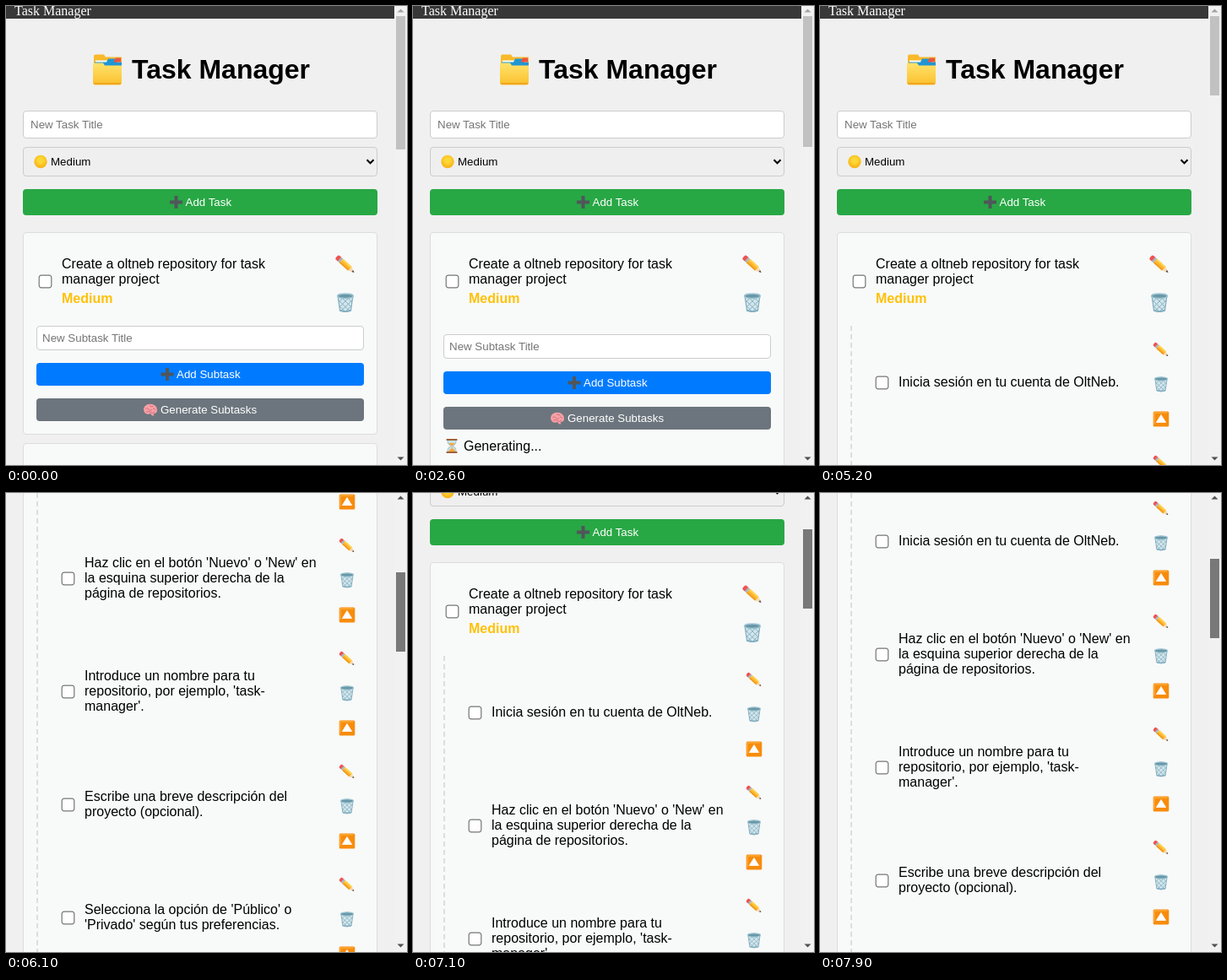
Recreate the animation shown at these times as an HTML page. Size 475x544 px, loop 8000 ms.

```html
<!DOCTYPE html>
<html lang="en">
<head>
<meta charset="utf-8">
<title>Task Manager</title>
<style>
  html, body { margin: 0; width: 100%; height: 100%; overflow: hidden; background: #f0f0f0; }
  svg { display: block; width: 100vw; height: 100vh; }
  text { font: 16px "Liberation Sans", Arial, sans-serif; fill: #000; }
  .serif { font-family: "Liberation Serif", "Times New Roman", serif; fill: #fff; }
  .h1 { font-size: 32px; font-weight: bold; }
  .level { font-weight: bold; fill: #ffc107; }
  .ui { font-size: 13.333px; }
  .hint { font-size: 13.333px; fill: #757575; }
  .btn { font-size: 13.333px; fill: #fff; }
  .card { fill: #f8f9f9; stroke: #ddd; }
  .field { fill: #fff; stroke: #ccc; }
</style>
</head>
<body>
<svg id="stage" viewBox="0 0 475 544">
  <defs>
    <linearGradient id="gold" x2="0" y2="1">
      <stop offset="0" stop-color="#ffe36c"/><stop offset="1" stop-color="#fbc02d"/>
    </linearGradient>
    <radialGradient id="ball" cy=".4">
      <stop offset=".4" stop-color="#fdd835"/><stop offset="1" stop-color="#f9b61b"/>
    </radialGradient>

    <!-- icons are centred on 0,0 -->
    <g id="folder">
      <path d="M-16 -14V14H17V-15H-2L-4 -18H-14Q-16 -18 -16 -16Z" fill="#f9b92a"/>
      <path d="M-14 -11H16V8H-14Z" fill="#fff"/>
      <path d="M-15 -9H-1L1 -13H10L12 -9H17V8H-15Z" fill="#2196d3"/>
      <path d="M8 -10L10 -14H16V-9H8Z" fill="#ef5340"/>
      <path d="M-17 -8H-5L-3 -5H17V15Q17 18 14 18H-14Q-17 18 -17 15Z" fill="url(#gold)"/>
      <path d="M-16 16.5H16" stroke="#f2a61d" stroke-width="2"/>
    </g>
    <g id="pencil" transform="rotate(42)">
      <path d="M-9 -3.2H-12Q-14 -3.2 -14 0T-12 3.2H-9Z" fill="#ef5350"/>
      <path d="M-9.5 -3.2H-6.5V3.2H-9.5Z" fill="#a9b5bb"/>
      <path d="M-6.5 -3.2H7L8 0L7 3.2H-6.5Z" fill="#ffb52e"/>
      <path d="M-6.5 -3.2H7V-1.2H-6.5Z" fill="#ffd54f"/>
      <path d="M-6.5 1.4H7V3.2H-6.5Z" fill="#f19a1b"/>
      <path d="M7 -3.2L14 0L7 3.2Q8 0 7 -3.2Z" fill="#f7d9ae"/>
      <path d="M11.2 -1.3L14.2 0L11.2 1.3Z" fill="#424242"/>
    </g>
    <g id="trash" fill="none" stroke="#82aec0">
      <path d="M-8.2 -7.5L-6 8.4Q0 11 6 8.4L8.2 -7.5Z" fill="#d3e6eb" stroke-width="1.1"/>
      <path d="M-7.6 -3L5 9M-7 3L0 9.6M-4 -6L6 4M2 -6L7 -1M7.6 -3L-5 9M7 3L0 9.6M4 -6L-6 4M-2 -6L-7 -1" stroke-width=".9"/>
      <path d="M-6 8Q0 10.6 6 8" stroke-width="1.6"/>
      <ellipse cy="-7.6" rx="8.7" ry="2.5" fill="#6a97a8" stroke="#9cc5d2" stroke-width="1.4"/>
    </g>
    <g id="raise">
      <rect x="-9.3" y="-9" width="18.6" height="18" rx="1.6" fill="#f78c0c"/>
      <path d="M-8.5 -8H7.5V-7H-7.5V6H-8.5Z" fill="#ffb74d"/>
      <path d="M0 -5L5.6 4H-5.6Z" fill="#fff" stroke="#fff" stroke-width=".8" stroke-linejoin="round"/>
    </g>
    <path id="plus" d="M-2 -7.5H2V-2H7.5V2H2V7.5H-2V2H-7.5V-2H-2Z" fill="#50565a"/>
    <g id="brain">
      <path d="M-7.8 1C-8.5 -4 -4 -7 0 -6.6C5 -7 8.4 -3 7.9 1C8 4 5 4.6 3.6 4.4L4.4 7H2L0 4.6C-3 6 -7 5 -7.8 1Z" fill="#f7a1a6"/>
      <path d="M-5.5 -1Q-3 -3 -2 -.5T2 0M-1 -5Q1 -3 3.5 -4M3 -1.5Q5 -2 6 .5M-5 2.6Q-2 1 0 3T5 2.4" fill="none" stroke="#d66f7d" stroke-width="1"/>
    </g>
    <g id="glass">
      <path d="M-5 -7V-4.5Q-5 -2 -1 0Q-5 2 -5 4.5V7H5V4.5Q5 2 1 0Q5 -2 5 -4.5V-7Z" fill="#c5e3ee" stroke="#8fb4c2" stroke-width=".7"/>
      <path d="M-3.6 -3.4H3.6Q3 -1.6 0 0Q-3 -1.6 -3.6 -3.4ZM-4 6.5Q-3 3.6 0 3T4 6.5Z" fill="#f5a93b"/>
      <path d="M0 0V4" stroke="#f5a93b"/>
      <path d="M-6.4 -8.6H6.4V-6.4H-6.4ZM-6.4 6.4H6.4V8.6H-6.4Z" fill="#a2603a"/>
    </g>
    <rect id="check" x="-7.3" y="-7.3" width="14.6" height="14.6" rx="2.6" fill="#fff" stroke="#767676" stroke-width="1.2"/>
  </defs>
  <rect width="475" height="544" fill="#f0f0f0"/>
  <g id="page"></g>
  <g id="bar">
    <rect x="460" width="15" height="544" fill="#f1f1f1"/>
    <path id="up" d="M463.5 7.5L467.5 3.5L471.5 7.5Z"/>
    <path d="M463.5 534.5L467.5 538.5L471.5 534.5Z" fill="#505050"/>
    <rect id="thumb" x="462" width="11"/>
  </g>
</svg>
<script>
const LOOP = 8000, ROW = 134, LIST_TOP = 379;
const $ = id => document.getElementById(id);

const text = (x, y, str, cls = '') => `<text x="${x}" y="${y}" class="${cls}">${str}</text>`;
const icon = (id, x, y, size = 1) => `<use href="#${id}" transform="translate(${x} ${y}) scale(${size})"/>`;
// bordered box given by its outer edges
const box = (x, y, w, h, attrs) =>
  `<rect x="${x + .5}" y="${y + .5}" width="${w - 1}" height="${h - 1}" rx="3.5" ${attrs}/>`;
const button = (x, y, w, h, fill, id = '') =>
  `<rect x="${x}" y="${y}" width="${w}" height="${h}" rx="4" fill="${fill}" id="${id}"/>`;

const steps = [
  ['Inicia sesión en tu cuenta de OltNeb.'],
  ["Haz clic en el botón 'Nuevo' o 'New' en", 'la esquina superior derecha de la', 'página de repositorios.'],
  ['Introduce un nombre para tu', "repositorio, por ejemplo, 'task-", "manager'."],
  ['Escribe una breve descripción del', 'proyecto (opcional).'],
  ["Selecciona la opción de 'Público' o", "'Privado' según tus preferencias."]
];

const stepRow = (lines, i) => {
  const y = LIST_TOP + ROW * i;
  return icon('check', 73.5, y + 67.5)
    + lines.map((s, k) => text(93, y + 72 - 9 * (lines.length - 1) + 18 * k, s)).join('')
    + icon('pencil', 404, y + 28.5, .8) + icon('trash', 404, y + 69.5, .86) + icon('raise', 404, y + 110.5);
};

$('page').innerHTML =
  '<rect width="460" height="15" fill="#383838"/>' + text(10, 11, 'Task Manager', 'serif')
  + icon('folder', 120, 75.5) + text(149, 86, 'Task Manager', 'h1')
  + box(20, 124, 420, 33, 'class="field"') + text(29, 145, 'New Task Title', 'hint')
  + box(20, 167, 420, 35, 'fill="#efefef" stroke="#ccc"')
  + '<circle cx="41" cy="184.5" r="7.7" fill="url(#ball)"/>' + text(53, 189, 'Medium', 'ui')
  + '<path d="M427.5 182.3L431.5 186.3L435.5 182.3" fill="none" stroke="#000" stroke-width="2"/>'
  + button(20, 217, 420, 31, '#28a745') + icon('plus', 201.5, 232.5) + text(212.5, 237, 'Add Task', 'btn')
  + box(20, 268, 420, 240, 'class="card" id="card"')
  + box(20, 518, 420, 240, 'class="card" id="next"')
  + icon('check', 46.5, 326.5)
  + text(66, 311, 'Create a oltneb repository for task') + text(66, 329, 'manager project')
  + text(66, 352, 'Medium', 'level')
  + icon('pencil', 402, 306.5) + icon('trash', 402, 352, 1.08)
  + '<g id="form">'
  + box(36, 379, 388, 29, 'class="field"') + text(43, 398, 'New Subtask Title', 'hint')
  + button(36, 423, 388, 27, '#007bff') + icon('plus', 191, 436.5) + text(202, 441, 'Add Subtask', 'btn')
  + button(36, 465, 388, 27, '#6c757d', 'make') + icon('brain', 171, 478.5) + text(183, 483, 'Generate Subtasks', 'btn')
  + '<g id="wait">' + icon('glass', 46, 511.5) + text(60, 517, 'Generating...') + '</g></g>'
  + '<g id="list">'
  + `<path d="M37 ${LIST_TOP}V2400" stroke="#ddd" stroke-width="2" stroke-dasharray="6 4"/>`
  + steps.map(stepRow).join('') + '</g>';

// [time, scroll offset]
const scrollKeys = [
  [5400, 0], [5500, 300], [5600, 476], [6000, 476], [6100, 479], [6200, 448], [6500, 297],
  [6700, 205], [6800, 180], [7000, 180], [7100, 186], [7200, 212], [7500, 345], [7600, 374],
  [7700, 384], [7800, 384], [7900, 389]
];
// [time, thumb colour]
const thumbKeys = [
  [0, '#c1c1c1'], [3600, '#a8a8a8'], [3900, '#c1c1c1'], [4200, '#a8a8a8'],
  [5200, '#c1c1c1'], [5600, '#a8a8a8'], [5900, '#787878']
];

const clamp = v => Math.min(1, Math.max(0, v));
const scrollAt = t => {
  const i = scrollKeys.findIndex(k => k[0] > t);
  if (i === 0) return 0;
  if (i < 0) return scrollKeys[scrollKeys.length - 1][1];
  const [t0, a] = scrollKeys[i - 1], [t1, b] = scrollKeys[i];
  return Math.round(a + (b - a) * (t - t0) / (t1 - t0));
};
const show = (id, on) => $(id).setAttribute('display', on ? 'inline' : 'none');
const set = (id, attrs) => { for (const k in attrs) $(id).setAttribute(k, attrs[k]); };

function draw(ms) {
  const t = Math.floor(ms / 100) * 100;
  const opened = t >= 800, waiting = t >= 2000, done = t >= 5200;
  const shift = opened ? 10 : 0;
  const cardHeight = done ? 1900 : waiting ? 290 : 240 + shift;
  const scroll = scrollAt(t);

  set('page', { transform: `translate(0 ${-scroll})` });
  set('card', { height: cardHeight - 1 });
  set('next', { y: 278.5 + cardHeight });
  set('form', { transform: `translate(0 ${shift})` });
  show('form', !done);
  show('wait', waiting);
  show('list', done);

  const hover = clamp((t - 1500) / 400) - clamp((t - 2200) / 400);
  const mix = (a, b) => Math.round(a + (b - a) * hover);
  set('make', { fill: `rgb(${mix(108, 90)},${mix(117, 98)},${mix(125, 104)})` });

  set('thumb', {
    y: 12 + Math.floor(scroll / 5.82),
    height: done ? 94 : waiting ? 155 : opened ? 157 : 158,
    fill: thumbKeys.filter(k => k[0] <= t).pop()[1]
  });
  set('up', { fill: scroll ? '#505050' : '#a3a3a3' });
}

const start = performance.now();
function tick() {
  draw((performance.now() - start) % LOOP);
  requestAnimationFrame(tick);
}
tick();
</script>
</body>
</html>
```
